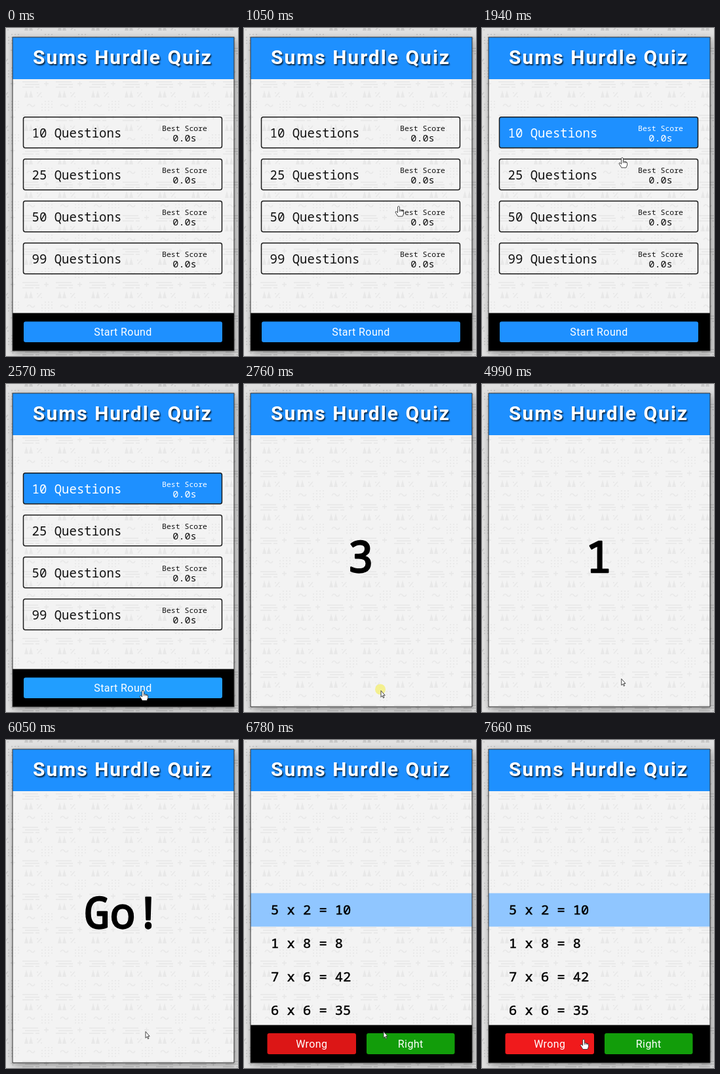
These frames come from a looping animation (354 px wide and 500 px high, 7.99 s). An HTML page with a canvas:

```html
<!DOCTYPE html>
<html lang="en">
<head>
<meta charset="utf-8">
<title>Sums Hurdle Quiz</title>
<style>
  html, body { margin: 0; width: 100%; height: 100%; overflow: hidden; background: #e0e0e0; }
  canvas { display: block; width: 354px; height: 500px; }
</style>
</head>
<body>
<canvas id="stage" width="354" height="500"></canvas>
<script>
const W = 354, H = 500, LOOP = 7990;
const MONO = '"Noto Sans Mono", "DejaVu Sans Mono", monospace';
const SANS = 'Roboto, "Open Sans", sans-serif';
const BLUE = '#1e90ff', INK = '#111';
const CARD = { x: 10, y: 14, w: 338, h: 478 };

// Times at which the screens and states switch
const SELECT = 1600, PRESS = 2710, START = 2755, RELEASE = 2840, QUIZ = 6780;
const COUNT = [[START, '3'], [3780, '2'], [4780, '1'], [5780, 'Go!']];

// Pointer tip: time, x, y
const PATH = [
  [780, 318, 479], [1050, 236, 272], [1330, 213, 160], [1470, 212, 166],
  [1800, 212, 166], [1940, 214, 197], [2570, 209, 467], [3160, 209, 467],
  [3300, 209, 464], [3570, 209, 464], [3640, 200, 466], [3780, 200, 466],
  [3980, 206, 449], [4240, 206, 449], [4380, 212, 460], [4730, 212, 460],
  [5060, 213, 446], [5200, 213, 446], [5260, 212, 445], [5980, 212, 445],
  [6050, 213, 444], [7180, 213, 444], [7660, 155, 456]
];

const canvas = document.getElementById('stage');
const ctx = canvas.getContext('2d');

function text(c, str, x, y, font, color, { align = 'left', spacing = 0, weight = 0 } = {}) {
  c.font = font;
  c.fillStyle = c.strokeStyle = color;
  c.textAlign = align;
  c.letterSpacing = spacing + 'px';
  c.fillText(str, x, y);
  if (weight) {
    c.lineWidth = weight;
    c.lineJoin = 'round';
    c.strokeText(str, x, y);
  }
}

function box(x, y, w, h, fill, stroke) {
  ctx.beginPath();
  ctx.roundRect(x, y, w, h, 3);
  if (fill) { ctx.fillStyle = fill; ctx.fill(); }
  if (stroke) { ctx.strokeStyle = stroke; ctx.lineWidth = 1.5; ctx.stroke(); }
}

function makeTile() {
  const tile = document.createElement('canvas');
  tile.width = tile.height = 51;
  const c = tile.getContext('2d');
  c.fillStyle = c.strokeStyle = '#c8c8c8';
  const bar = (x, y, w, h = 1.7) => c.fillRect(x, y, w, h);

  bar(0, 1.3, 24); bar(4, 5.3, 22); bar(0, 9.3, 17); bar(20, 9.3, 6);
  bar(33, 4, 7); bar(35.6, 1.5, 1.7, 7);
  for (const x of [3, 10]) {
    c.beginPath();
    c.moveTo(x + 3, 15);
    c.lineTo(x + 6, 26);
    c.lineTo(x, 26);
    c.fill();
  }
  c.lineWidth = 1.5;
  c.beginPath();
  c.moveTo(23, 25);
  c.lineTo(29, 18);
  c.moveTo(7, 39);
  c.quadraticCurveTo(10, 34, 13, 38);
  c.quadraticCurveTo(16, 42, 19, 37);
  c.stroke();
  bar(22, 18, 2); bar(28, 24, 2);
  for (let i = 0; i < 4; i++)
    for (let j = 0; j < 4; j++)
      if (i + j > 0 && i + j < 6) bar(29 + i * 5, 31 + j * 4.5, 2);
  return tile;
}

// Everything that never changes: backdrop, card and header
function makeBackdrop() {
  const layer = document.createElement('canvas');
  layer.width = W;
  layer.height = H;
  const c = layer.getContext('2d');
  const { x, y, w, h } = CARD;
  c.fillStyle = '#e0e0e0';
  c.fillRect(0, 0, W, H);

  const pattern = c.createPattern(makeTile(), 'repeat');
  pattern.setTransform(new DOMMatrix().translate(25, 80));
  const drawPattern = () => { c.fillStyle = pattern; c.fillRect(0, 0, W, H); };
  drawPattern();

  c.save();
  c.shadowColor = 'rgba(0,0,0,.4)';
  c.shadowBlur = 10;
  c.shadowOffsetX = 2;
  c.shadowOffsetY = 3;
  c.fillStyle = '#f3f3f3';
  c.fillRect(x, y, w, h);
  c.restore();

  c.save();
  c.beginPath();
  c.rect(x, y, w, h);
  c.clip();
  c.globalAlpha = 0.25;
  drawPattern();
  c.restore();

  c.fillStyle = BLUE;
  c.fillRect(x, y, w, 64);
  c.shadowColor = 'rgba(0,0,0,.75)';
  c.shadowBlur = 2;
  c.shadowOffsetX = c.shadowOffsetY = 1.5;
  text(c, 'Sums Hurdle Quiz', 41, 55, '700 30px ' + SANS, '#fff', { spacing: 2 });
  return layer;
}

function pointerAt(t) {
  let i = 0;
  while (i < PATH.length - 2 && t >= PATH[i + 1][0]) i++;
  const [t0, x0, y0] = PATH[i], [t1, x1, y1] = PATH[i + 1];
  const k = Math.min(1, Math.max(0, (t - t0) / (t1 - t0)));
  return { x: x0 + (x1 - x0) * k, y: y0 + (y1 - y0) * k };
}

const HAND = new Path2D('M-1.4 1Q0-.8 1.4 1V6Q2.6 5 3.6 6.4Q5 5.8 5.8 7.2Q7.6 6.8 7.6 8.8V11.5L6 15.5H-1L-4.8 9.6Q-5 7.6-3.2 8.2L-1.4 10Z');
const ARROW = new Path2D('M0 0.5V10.3L2 8.2L3.5 11.6L4.9 11L3.5 7.6H6.2Z');

function pointer(p, isHand) {
  const shape = isHand ? HAND : ARROW;
  ctx.save();
  ctx.translate(p.x, p.y);
  ctx.lineJoin = 'round';
  ctx.lineWidth = 0.9;
  ctx.fillStyle = '#fff';
  ctx.strokeStyle = '#333';
  ctx.fill(shape);
  ctx.stroke(shape);
  if (isHand) {
    ctx.beginPath();
    for (const x of [1.4, 3.6, 5.6]) {
      ctx.moveTo(x, 6);
      ctx.lineTo(x, 8.5);
    }
    ctx.stroke();
  }
  ctx.restore();
}

function button(label, x, y, w, h, color) {
  box(x, y, w, h, color);
  text(ctx, label, x + w / 2, 469, '400 16px ' + SANS, '#fff', { align: 'center', spacing: 0.4 });
}

function footer() {
  ctx.fillStyle = '#000';
  ctx.fillRect(CARD.x, 434.5, CARD.w, 57.5);
}

function menu(t, p) {
  [10, 25, 50, 99].forEach((n, i) => {
    const y = 135.75 + i * 64;
    const picked = i === 0 && t >= SELECT;
    const color = picked ? '#fff' : INK;
    const center = { align: 'center' };
    box(26.5, y, 303, 47, picked && BLUE, '#1c1c1c');
    text(ctx, n + ' Questions', 39.5, y + 31.5, '19px ' + MONO, color);
    text(ctx, 'Best Score', 272.5, y + 21.5, '11.5px ' + MONO, color, center);
    text(ctx, '0.0s', 272.5, y + 37.5, '15.2px ' + MONO, color, center);
  });
  footer();
  const hover = t > 1940 && p.y >= 448;
  button('Start Round', 27, 447.5, 303, 31.5, hover ? '#219eff' : BLUE);
}

function countdown(t) {
  const label = COUNT.filter(step => t >= step[0]).pop()[1];
  text(ctx, label, 178, 287, '65px ' + MONO, '#000', { align: 'center', weight: 2.4 });
}

function quiz(hover) {
  ctx.fillStyle = '#90c6ff';
  ctx.fillRect(CARD.x, 233.5, CARD.w, 51);
  ['5 x 2 = 10', '1 x 8 = 8', '7 x 6 = 42', '6 x 6 = 35'].forEach((line, i) =>
    text(ctx, line, 41, 266 + i * 51, '20.4px ' + MONO, '#000', { weight: 0.5 }));
  footer();
  button('Wrong', 35.5, 447, 135.5, 32, hover ? '#f01a1c' : '#dc1616');
  button('Right', 187, 447, 134.5, 32, '#129d0a');
}

const backdrop = makeBackdrop();

function draw(t) {
  const p = pointerAt(t);
  const onWrong = t >= QUIZ && p.x < 171;
  ctx.drawImage(backdrop, 0, 0);
  if (t < START) menu(t, p);
  else if (t < QUIZ) countdown(t);
  else quiz(onWrong);

  ctx.strokeStyle = '#333';
  ctx.lineWidth = 1;
  ctx.strokeRect(CARD.x, CARD.y, CARD.w, CARD.h);

  if (t >= PRESS && t < RELEASE) {
    ctx.fillStyle = 'rgba(243,239,125,.85)';
    ctx.beginPath();
    ctx.arc(p.x - 1, p.y - 1.5, 8, 0, Math.PI * 2);
    ctx.fill();
  }
  if (t >= PATH[0][0]) pointer(p, t < START || onWrong);
}

const begin = performance.now();
function frame() {
  draw((performance.now() - begin) % LOOP);
  requestAnimationFrame(frame);
}
frame();
</script>
</body>
</html>
```
